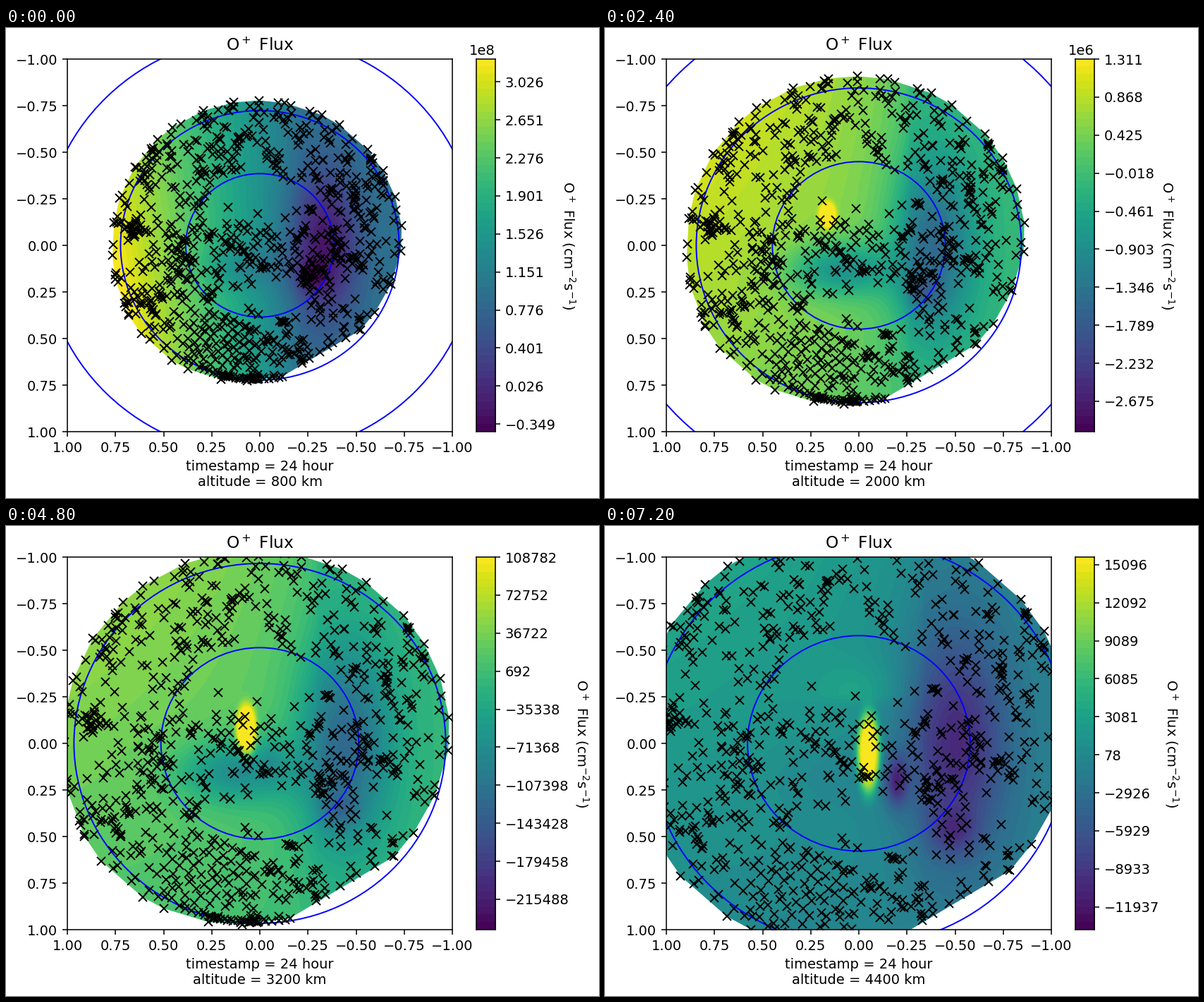
Recreate the animation shown at these times as a matplotlib script. Size 841 by 666 pixels, loop 8000 ms.

```python
import numpy as np
import matplotlib.pyplot as plt
from matplotlib.animation import FuncAnimation
from matplotlib.patches import Ellipse, Polygon

W, H, DPI = 841, 666, 140
EARTH = 6371
BANDS = 49
ALTITUDES = range(800, 4401, 400)

# Lowest level and tick step of the colour scale at each altitude.
SCALES = [
    (-.424e8, .375e8), (-2.88328e7, .5412e7), (-9.41e6, 1.52e6),
    (-3.029312e6, .44289e6), (-1.31e6, .1913e6), (-568800.32, 82018.86),
    (-244312, 36030), (-105541.41, 16928.3), (-39319.416, 7206.39),
    (-13738.934, 3003.64)]

# Empty zones between the satellite tracks: place and radii.
VOIDS = [(-.03, -.225, .22, .125), (.07, .25, .14, .085),
         (-.12, .26, .09, .06)]
LATTICE = (-.2, .46, .17, .12)


# Places are (u right, v down) in units of the orbit radius.
def make_hull(rng):
    """A round outline whose lower right is cut by a straight edge."""
    a = np.radians(np.linspace(42, -280, 28))
    a[1:-1] += rng.normal(0, .03, len(a) - 2)
    r = .668 - .06 * np.maximum(np.sin(a), 0) * np.cos(a)
    return np.column_stack((r * np.cos(a) - .01, r * np.sin(a) - .023))


def inside_ellipse(p, u, v, ru, rv):
    return ((p[0] - u) / ru) ** 2 + ((p[1] - v) / rv) ** 2 < 1


def inside_hull(p, hull):
    a, b = hull, np.roll(hull, -1, axis=0)
    cross = (b[:, 0] - a[:, 0]) * (p[1] - a[:, 1]) \
        - (b[:, 1] - a[:, 1]) * (p[0] - a[:, 0])
    return np.all(cross < 0)


def make_points(rng, hull, count=850):
    pts = [tuple(p) for p in hull]
    pts += [(.66 * np.sin(a) - .01, .66 * np.cos(a) - .023)
            for a in np.linspace(-.42, .15, 17)]
    pts += [(-.145, -.182), (-.01, -.15)]
    for i in range(-10, 11):
        for j in range(-10, 11):
            p = (LATTICE[0] + .026 * (i + j) + rng.normal(0, .006),
                 LATTICE[1] + .022 * (i - j) + rng.normal(0, .006))
            if inside_ellipse(p, *LATTICE):
                pts.append(p)
    while len(pts) < count:
        clumped = rng.random() < .3
        if clumped:
            p = tuple(pts[rng.integers(len(pts))] + rng.normal(0, .016, 2))
        else:
            p = tuple(rng.uniform(-.7, .7, 2))
        if not inside_hull(p, hull) or inside_ellipse(p, *LATTICE):
            continue
        if any(inside_ellipse(p, *z) for z in VOIDS):
            continue
        if clumped or np.hypot(*(np.array(pts) - p).T).min() > .021:
            pts.append(p)
    return np.array(pts)


def field(u, v, t, zero):
    """Flux as a share of the colour scale; t runs from 0 to 1 with height."""
    def spot(cu, cv, su, sv, sharp=1):
        return np.exp(-(((u - cu) / su) ** 2 + ((v - cv) / sv) ** 2) ** sharp)

    night = zero - .03 + .29 * np.exp(-25 * t)
    day = np.clip((.2 - u) / .85, 0, 1) ** (.45 + .55 * np.exp(-12 * t))
    tilt = v * (.26 * np.exp(-12 * t) - .12)
    z = night + day * (.1 + .5 * np.exp(-4 * t) + tilt)

    # polar cap, its deepest spot and the trough on the day side
    z -= .32 * spot(.3, 0, .16, .36)
    z -= .15 * spot(.24 + .05 * t, .15 + .13 * t, .07, .07)
    z -= .3 * np.sin(np.pi * (t + .15) / 1.2) * spot(-.08, .1, .2, .11)

    # plume that drifts across the pole and stretches with height
    c = -.2 + .23 * t
    z += .6 * t ** .7 * spot(c, c, .035, .02 + .11 * t, 2)
    z -= .3 * t ** 4 * spot(c + .085, c + .09, .035, .08)

    # short-lived dome above the pole
    dome = .45 * np.exp(-((t - .88) / .09) ** 2)
    z += dome * spot(0, -.16, .13, np.where(v < -.16, .1, .03))
    return np.clip(z, .001, .999)


def text_width(s):
    """Width in pixels of a 10 pt number."""
    em = {".": .318, "\u2212": .838}
    return sum(em.get(c, .636) for c in s) * DPI * 10 / 72


def box(x0, y0, x1, y1):
    return [x0 / W, 1 - y1 / H, (x1 - x0) / W, (y1 - y0) / H]


plt.rcParams["font.family"] = "DejaVu Sans"
fig = plt.figure(figsize=((W + .001) / DPI, (H + .001) / DPI), dpi=DPI)
ax = fig.add_axes(box(87, 44, 633, 572))
cax = fig.add_axes(box(667, 44, 694, 572))

ax.set_xlim(1, -1)
ax.set_ylim(1, -1)
ax.set_xticks(np.linspace(1, -1, 9))
ax.set_yticks(np.linspace(1, -1, 9))
ax.set_title("O$^+$ Flux")

bar = cax.imshow((np.arange(BANDS)[:, None] + .5) / BANDS, origin="lower",
                 aspect="auto", extent=(0, 1, 0, 1), vmin=0, vmax=1,
                 cmap="viridis", interpolation="nearest")
cax.set_xticks([])
cax.yaxis.tick_right()
cax.yaxis.get_offset_text().set_visible(False)

exponent = fig.text(694 / W, 1 - 38 / H, "", ha="right", va="baseline")
unit = fig.text(0, 1 - 308 / H, "O$^+$ Flux (cm$^{-2}$s$^{-1}$)",
                rotation=270, ha="center", va="center")

rng = np.random.default_rng(24)
hull = make_hull(rng)
points = make_points(rng, hull)
markers, = ax.plot([], [], "kx", ms=6, mew=1, zorder=3)
rings = [Ellipse((0, 0), 1, 1, fill=False, ec="blue", lw=1, zorder=2)
         for _ in range(3)]
for ring in rings:
    ax.add_patch(ring)

grid_x, grid_y = np.meshgrid(np.linspace(-1, 1, 241), np.linspace(-1, 1, 241))
shown = []


def draw_scale(lo, step):
    levels = lo + step / 5 * np.arange(BANDS + 1)
    first = min(range(5), key=lambda i: np.abs(levels[i::5]).min())
    ticks = levels[first::5]
    bar.set_extent((0, 1, lo, levels[-1]))
    cax.set_yticks(ticks)
    cax.set_ylim(lo, levels[-1])
    form = cax.yaxis.get_major_formatter()
    labels = form.format_ticks(ticks)
    exponent.set_text(form.get_offset())
    unit.set_x((726 + max(map(text_width, labels))) / W)


def update(i):
    alt = ALTITUDES[i]
    radius = (EARTH + alt) / EARTH
    lo, step = SCALES[i]

    while shown:
        shown.pop().remove()
    z = field(-grid_x / radius, grid_y / radius, i / (len(ALTITUDES) - 1),
              -lo / (step / 5 * BANDS))
    area = ax.contourf(grid_x, grid_y, z, np.linspace(0, 1, BANDS + 1),
                       cmap="viridis", zorder=1)
    area.set_clip_path(Polygon(hull * (-radius, radius),
                               transform=ax.transData))
    shown.append(area)

    markers.set_data(-points[:, 0] * radius, points[:, 1] * radius)
    for ring, angle in zip(rings, (20, 40, 90)):
        ring.width = ring.height = 2 * radius * np.sin(np.radians(angle))
    ax.set_xlabel(f"timestamp = 24 hour\naltitude = {alt} km")
    draw_scale(lo, step)
    return []


anim = FuncAnimation(fig, update, frames=len(ALTITUDES), interval=800,
                     init_func=lambda: [], repeat=True, repeat_delay=0,
                     blit=False)
plt.show()
```
